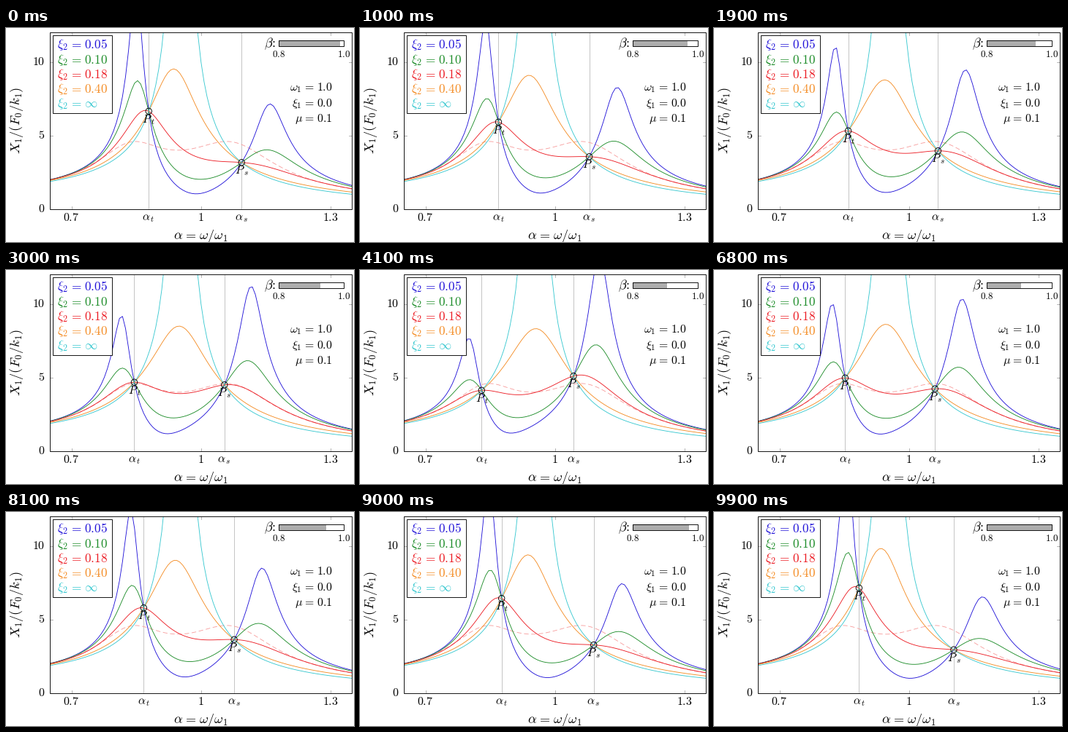
These frames come from a looping animation (476 px wide and 294 px high, 10000 ms). A matplotlib script:

```python
import numpy as np
import matplotlib.pyplot as plt
from matplotlib.animation import FuncAnimation
from matplotlib.patches import Circle, Rectangle

plt.rcParams["mathtext.fontset"] = "cm"

W, H, DPI = 476, 294, 100
FRAMES, INTERVAL = 100, 100
MU = 0.1
LEFT, RIGHT, TOP, BOTTOM = 60.2, 473.3, 6.3, 248.5
PT = 72 / DPI

CURVES = [
    (0.05, "0.05", "#2012d8"),
    (0.10, "0.10", "#1c8c28"),
    (0.18, "0.18", "#ec1c24"),
    (0.40, "0.40", "#f48c24"),
    (np.inf, r"\infty", "#38c8d0"),
]

fig = plt.figure(figsize=(W / DPI, H / DPI), dpi=DPI, facecolor="white")
ax = fig.add_axes([0, 0, 1, 1])
ax.set_xlim(0, W)
ax.set_ylim(H, 0)
ax.axis("off")


def px(a):
    return LEFT + (a - 0.65) / 0.7 * (RIGHT - LEFT)


def py(v):
    return BOTTOM - v / 12 * (BOTTOM - TOP)


def stiff_gain(a):
    """Response with the absorber locked to the main mass."""
    return 1 / np.abs(1 - (1 + MU) * a**2)


def gain(a, beta, xi):
    if np.isinf(xi):
        return stiff_gain(a)
    damp = (2 * xi * a * beta) ** 2
    a2, b2 = a**2, beta**2
    num = damp + (a2 - b2) ** 2
    den = damp * (a2 * (1 + MU) - 1) ** 2 + (MU * b2 * a2 - (a2 - 1) * (a2 - b2)) ** 2
    return np.sqrt(num / den)


def fixed_points(beta):
    """Frequencies at which all the curves meet."""
    half = 1 + (1 + MU) * beta**2
    root = np.sqrt(half**2 - 2 * (2 + MU) * beta**2)
    return [np.sqrt((half + s * root) / (2 + MU)) for s in (-1, 1)]


def label(x, y, tex, size, ha="center", color="black", z=6, **kw):
    tex = tex.replace("=", r"\hspace{0.1}=\hspace{0.1}")
    return ax.text(x, y, f"${tex}$", fontsize=size, ha=ha, va="baseline",
                   color=color, zorder=z, **kw)


def stroke(x, y, color, width, z, **kw):
    return ax.plot(x, y, color=color, lw=width * PT, zorder=z, **kw)[0]


def box(x0, y0, x1, y1, z, face="none", edge="black", width=0.9):
    return ax.add_patch(Rectangle((x0, y0), x1 - x0, y1 - y0, facecolor=face,
                                  edgecolor=edge, lw=width * PT, zorder=z))


# Axes
frame = box(LEFT, TOP, RIGHT, BOTTOM, 5)
for a, name in ((0.7, "0.7"), (1, "1"), (1.3, "1.3")):
    for y, d in ((BOTTOM, -4), (TOP, 4)):
        stroke([px(a)] * 2, [y, y + d], "0.5", 0.6, 1)
    label(px(a) - 0.3, 265.3, name, 11.4)
for v in (0, 5, 10):
    if v:
        for x, d in ((LEFT, 4), (RIGHT, -4)):
            stroke([x, x + d], [py(v)] * 2, "0.5", 0.6, 1)
    label(52.8, py(v) + 4.7, str(v), 11.4, ha="right")
label(266.5, 290.3, r"\alpha=\omega/\omega_1", 13.1)
label(19, 126.5, r"X_1/(F_0/k_1)", 13.2, rotation=90, rotation_mode="anchor")

# Legend and parameters
box(64.2, 10.3, 145.3, 117, 7, face="white")
for i, (_, name, color) in enumerate(CURVES):
    label(70.5, 28.4 + 20.2 * i, rf"\xi_2={name}", 12.4, "left", color, 8)
for i, tex in enumerate((r"\omega_1=1.0", r"\xi_1=0.0", r"\mu=0.1")):
    label(446.5, 86.5 + 21.3 * i, tex, 11.4, ha="right")

# Tuning gauge
BAR0, BAR1 = 373.4, 462.4
label(369, 26, r"\beta\!:", 13, ha="right")
label(BAR0, 40.4, "0.8", 9.4)
label(BAR1, 40.4, "1.0", 9.4)
box(BAR0, 17.2, BAR1, 25.2, 6, face="white", edge="none")
fill = box(BAR0, 17.2, BAR1, 25.2, 7, face="0.68", edge="none")
box(BAR0, 17.2, BAR1, 25.2, 8)

# Curves
alpha = np.linspace(0.65, 1.35, 101)
best_beta = 1 / (1 + MU)
best_xi = np.sqrt(3 * MU / (8 * (1 + MU)))
dashed = stroke(px(alpha), py(gain(alpha, best_beta, best_xi)), "#f8a0a0", 0.9, 2,
                dashes=(7, 4))
dashed.set_clip_path(frame)
lines = []
for xi, _, color in CURVES:
    line = stroke(px(alpha), py(np.minimum(gain(alpha, 1, xi), 200)), color, 0.88, 3)
    line.set_clip_path(frame)
    lines.append(line)

# Meeting points
marks = []
for s in "ts":
    rule = stroke([0, 0], [TOP, BOTTOM], "0.75", 0.9, 1.5)
    ring = ax.add_patch(Circle((0, 0), 4.2, facecolor="none", edgecolor="black",
                               lw=0.9 * PT, zorder=5))
    sub = rf"_{{\hspace{{0.2}}{s}}}"
    marks.append((rule, ring, label(0, 0, "P" + sub, 11.3),
                  label(0, 264.8, r"\alpha" + sub, 11.3)))


def beta_at(i):
    return min(1, 0.8738 + 0.0024 * abs(i - 46.4))


def gauge_at(i):
    turn, low = 57.2, 0.872
    rate = -0.00202 if i < turn else 0.00305
    return min(1, low + rate * (i - turn))


def update(i):
    beta = beta_at(i)
    for line, (xi, _, _) in zip(lines, CURVES):
        line.set_ydata(py(np.minimum(gain(alpha, beta, xi), 200)))
    for a, (rule, ring, point, tick) in zip(fixed_points(beta), marks):
        x, y = px(a), py(stiff_gain(a))
        rule.set_xdata([x, x])
        ring.center = x, y
        point.set_position((x, y + 16))
        tick.set_x(x)
    fill.set_width((gauge_at(i) - 0.8) / 0.2 * (BAR1 - BAR0))
    return []


anim = FuncAnimation(fig, update, frames=FRAMES, interval=INTERVAL, repeat=True,
                     repeat_delay=0, init_func=lambda: update(0))
plt.show()
```
